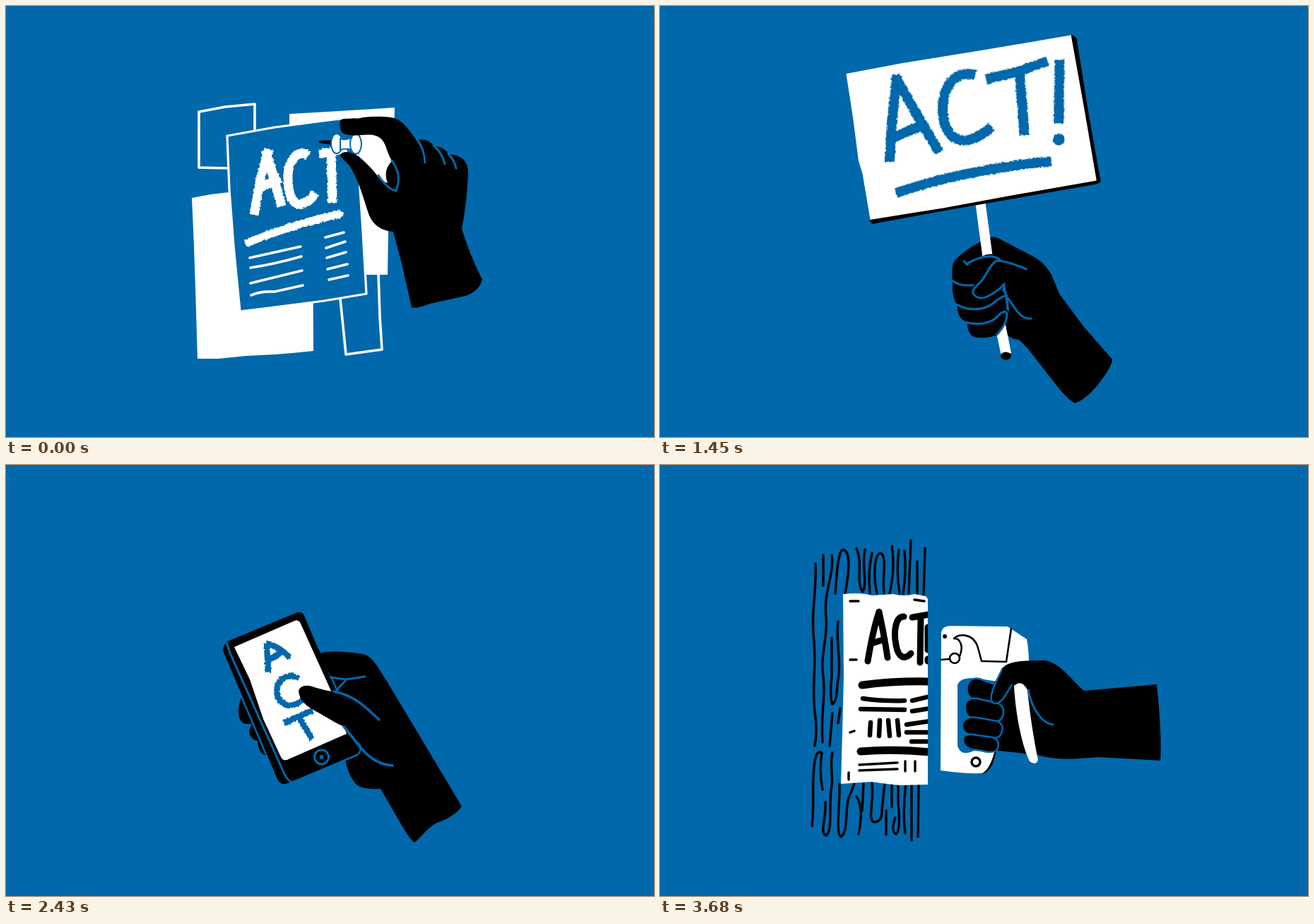
Write an HTML page that moves like this. It is 917 px wide and 611 px high and loops after 4.18 s.

```html
<!DOCTYPE html>
<html lang="en">
<head>
<meta charset="utf-8">
<title>Act</title>
<style>
  html, body { margin: 0; width: 100%; height: 100%; overflow: hidden; background: #0068ab; }
  svg { display: block; width: 100%; height: 100%; }
  path, circle, ellipse { stroke-linecap: round; stroke-linejoin: round; }
  .k { fill: #000; }
  .w { fill: #fff; }
  .b { fill: #0068ab; }
  .ks { fill: none; stroke: #000; stroke-width: 3.4; }
  .ws { fill: none; stroke: #fff; stroke-width: 3.6; }
  .bs { fill: none; stroke: #0068ab; stroke-width: 3; }
  .brush { filter: url(#rough); }
  .brush path { stroke-linecap: butt; }
  #screen.inverted .w { fill: #0068ab; }
  #screen.inverted .bs { stroke: #fff; }
</style>
</head>
<body>
<svg viewBox="0 0 917 611">
  <defs>
    <filter id="rough" x="-10%" y="-10%" width="120%" height="120%" color-interpolation-filters="sRGB">
      <feTurbulence type="fractalNoise" baseFrequency=".3" numOctaves="2" seed="4"/>
      <feDisplacementMap in="SourceGraphic" scale="4" xChannelSelector="R" yChannelSelector="G"/>
    </filter>
    <clipPath id="outsidePaper"><path d="M414 0H917V611H414Z"/></clipPath>
    <clipPath id="notice"><path d="M0 0H379V611H0Z"/></clipPath>
  </defs>

  <!-- Pinning a poster -->
  <g id="pinScene">
    <path class="w" d="M263 272L290 267L316 264H434L435 489L405 492L380 494L340 496L300 500L271 500L268 400L266 340Z"/>
    <path class="ws" d="M352 178V139L310 143L273 150V229L318 230"/>
    <path class="w" d="M401 153L470 149L550 144L548 220L541 320L540 381H500V160L401 175Z"/>
    <path class="ws" d="M473 415L481 494L532 487L529 440L527 380"/>
    <path class="b" stroke="#fff" stroke-width="3.2" d="M313 184L380 172L440 164L496 157L498 215L505 320L510 408L450 418L380 427L331 433L322 340L316 260Z"/>
    <g class="ws brush" style="stroke-width:13">
      <path d="M351 296L360 245L372 203M367 204L378 240L390 284M356 259L388 244"/>
      <path d="M428 212C414 202 400 218 399 240C399 270 406 284 420 280C428 278 433 272 438 265"/>
      <path d="M443 210L482 202M460 206L462 279"/>
      <path style="stroke-width:11;stroke-linecap:round" d="M343 335C380 320 420 306 472 295"/>
    </g>
    <path class="ws" d="M345 357L417 341M346 371Q380 366 418 355M346 393L419 375M347 410Q360 404 380 405L420 396M452 328L478 321M453 343L480 334M454 357L481 349M455 373L483 366M457 388L484 382"/>
    <g clip-path="url(#outsidePaper)">
      <g id="pin">
        <path class="k" d="M442 191L462 190V197L443 194Z"/>
        <g class="w" stroke="#0068ab" stroke-width="2">
          <ellipse cx="468" cy="195" rx="8" ry="14"/>
          <path d="M473 188Q482 191 490 186V204Q482 201 473 204Z"/>
          <ellipse cx="495" cy="195.500" rx="8" ry="14"/>
        </g>
      </g>
    </g>
    <g id="pinHand">
      <path id="pinFingers" class="k"/>
      <path class="bs" d="M527 240Q540 260 552 262Q561 240 546 219M581 188Q592 202 593 222M605 198Q616 206 621 224M626 210Q634 217 637 230"/>
    </g>
  </g>

  <!-- Waving a sign -->
  <g id="signScene">
    <path class="k" d="M500 375L540 363Q553 378 560 395L565 408L600 455L640 501Q640 509 625 530Q604 558 587 563Q576 558 555 530L520 485L508 473Q496 472 490 465L488 430Z"/>
    <path class="w" d="M475 459L489 452L497 492L483 496Z"/>
    <ellipse class="k" cx="489.500" cy="496" rx="7.500" ry="5.500"/>
    <path class="bs" d="M488 405Q493 416 500 425Q512 445 525 443"/>
    <g id="sign">
      <path class="k" d="M416 362C425 352 440 340 455 334C462 328 470 326 478 329L524 353Q545 363 556 385L505 425L488 408L491 440L480 465C470 470 450 473 442 468C434 460 436 452 434 448C424 444 420 436 421 424C415 418 413 405 414 393C413 385 412 370 416 362Z"/>
      <path class="w" d="M445 275L459 273L470 352Q462 351 456 355Z"/>
      <path class="k" d="M575 42L583 41L588 46L605 150L623 249L617 252L400 291L300 310L296 305Z"/>
      <path class="w" d="M262 97L340 82L460 62L580 41L600 150L617 247L500 268L400 287L345 296L297 304L286 240L280 220L272 160Z"/>
      <g class="bs brush" style="stroke-width:14">
        <path d="M324 222L327 165L334 99M331 100L362 154L394 208M330 187L376 167"/>
        <path d="M445 98C413 89 398 120 399 148C400 182 417 194 436 190C450 187 459 179 468 171"/>
        <path d="M460 104L505 93L547 78M507 92L515 183M564 76L563 166"/>
        <path d="M333 266Q430 232 553 220"/>
        <circle class="b" cx="563" cy="189" r="8.500" stroke="none"/>
      </g>
      <path class="bs" d="M430 362L435 367M433 366Q465 348 480 359M518 373C500 365 485 361 476 361C467 366 462 381 455 390C448 397 441 402 443 407C447 416 458 415 463 412C474 407 482 400 487 394Q486 402 490 410M414 390Q424 398 443 396M421 424C435 432 455 432 468 424C476 418 482 412 488 411M434 449C450 453 468 450 477 441C485 432 492 430 491 440Q489 453 477 466"/>
      <path class="b" d="M487 394L484 403L490 411L490 430L494 433L493 416Z"/>
    </g>
  </g>

  <!-- Tapping a phone -->
  <g id="phoneScene">
    <path class="k" d="M333 330C327 345 327 362 338 367H348C341 378 345 389 356 391C356 402 361 411 369 412L390 400L350 320Z"/>
    <path class="k" d="M443 267C460 262 490 266 505 268C520 272 526 287 535 300L580 375L645 484C640 492 625 503 610 507C595 515 588 528 578 535C570 531 556 503 530 459C515 460 500 458 495 452C488 444 483 432 481 422L470 380L440 300Z"/>
    <path class="k" stroke="#0068ab" stroke-width="2.500" d="M317 247L411 208C416 206 421 208 423 213L501 396C503 404 501 408 497 411L400 452C392 455 386 453 383 446L306 264C305 256 309 251 317 247Z"/>
    <path class="k" d="M425 228L445 266L475 290L461 303Z"/>
    <path class="bs" d="M312 252L318 269L394 438Q398 447 405 450"/>
    <circle class="bs" cx="446.500" cy="414" r="10"/>
    <circle class="b" cx="446.500" cy="414" r="3"/>
    <g id="screen">
      <path class="w" d="M323 258L408 221C413 219 416 222 417 225L459 318L482 381L400 417C394 420 391 418 389 414L364 360L345 304Z"/>
      <g class="bs brush" style="stroke-width:8.500">
        <path d="M371 294L369 252M368 253Q383 255 402 273M371 277L389 266"/>
        <path d="M414 303C405 296 391 299 385 311C380 326 388 339 400 341Q413 341 424 329"/>
        <path d="M393 366L434 348M413 355L433 389"/>
      </g>
    </g>
    <path class="bs" d="M459 301L481 304L508 300M482 304L468 319"/>
    <g id="thumb">
      <path class="k" d="M414 320Q417 311 430 313C445 318 460 321 470 323C490 328 507 337 528 361L547 426C532 426 515 413 505 400C494 388 486 375 476 370C463 364 448 354 440 350C425 342 415 334 414 320Z"/>
      <path class="bs" style="stroke-width:3.600" d="M464 321C490 326 506 340 528 361M478 371C490 384 502 405 517 415Q530 425 547 426"/>
    </g>
  </g>

  <!-- Stapling a notice to a post -->
  <g id="stapleScene">
    <g class="ks">
      <path d="M220 140C222 180 213 210 218 250C221 290 215 310 219 350Q223 375 219 398M231 128V171M243 128C247 155 231 180 235 215C238 245 226 270 231 300C235 330 227 350 230 393M248 182C250 160 251 122 259 120C270 122 268 150 262 182M252 222C248 250 258 280 251 310Q250 337 244 339Q240 330 243 300V245M255 345L252 366M244 352L240 398"/>
      <path d="M278 118C288 140 276 165 287 180C294 165 285 145 290 120M300 125Q294 150 297 182M307 182C301 155 304 126 312 125C322 128 314 160 317 182M328 115Q333 145 325 182M338 120Q334 150 339 182M346 122Q349 150 344 182M355 107L352 182M364 137V182M375 118L373 184"/>
      <path d="M215 512C219 480 214 450 219 420Q222 403 229 408Q225 435 230 460M234 478C236 500 225 522 235 525C245 520 238 480 243 455C245 440 240 425 244 408M254 452C255 480 248 522 256 527C268 520 260 480 270 465L275 452M278 470Q289 485 281 523M288 452L286 490M300 452C303 475 294 502 302 506Q315 507 314 488L318 452M320 490V524M328 452V485M333 500Q326 520 334 523Q341 518 337 480V452M348 452Q343 490 347 522M356 452V532M366 452L365 527"/>
    </g>
    <path class="w" d="M259 183Q285 180 300 185L330 183Q345 187 360 183L376 186L379 190V453L340 454Q318 452 300 449L256 452L258 380L260 300Z"/>
    <g class="ks" clip-path="url(#notice)">
      <path style="stroke-width:9" d="M294 278Q301 235 310 208Q317 240 322 273M299 253L318 247M345 215C334 214 330 235 334 255C337 273 346 277 355 267M357 216L380 212M369 216L368 280M379 230V262M379 275V278"/>
      <path style="stroke-width:11" d="M286 312Q330 306 382 307M284 406Q330 402 382 407"/>
      <path style="stroke-width:6.500" d="M287 331Q315 335 346 334M284 346L346 347M357 334L382 328M357 349L382 345M349 368L382 363M349 379H382M356 392H382M298 365L297 383M311 362L310 384M323 362L325 384M336 362L338 383"/>
      <path d="M282 425L336 422M282 433L336 431M347 420V434M361 420V434M269 193H281M269 276H278M269 379L275 377M267 436V446M360 191L374 193"/>
    </g>
    <g id="stapler">
      <path class="k" d="M455 438C468 436 474 420 477 398L470 395Z"/>
      <path class="w" d="M398 237Q399 229 410 228L492 229L519 247Q524 270 521 325L476 395C472 415 466 432 456 437Q430 438 397 433Z"/>
      <path class="b" d="M421 312Q424 301 445 302L485 308V392L446 404Q426 415 421 398Z"/>
      <path class="ks" style="stroke-width:2.600" d="M398 276L410 275M424 271C430 258 425 245 416 246C422 239 442 238 449 256Q452 266 455 278L490 279L497 232"/>
      <circle class="ks" style="stroke-width:2.600" cx="417" cy="274" r="7"/>
      <circle class="ks" cx="447" cy="421" r="6"/>
      <circle class="k" cx="403" cy="243" r="3"/>
      <path class="k" d="M485 288C492 278 515 277 545 277C570 283 580 303 600 320L703 311C707 350 710 390 708 419L620 414C590 417 560 419 535 411L478 405L455 401L450 315L468 318Z"/>
      <g class="k" stroke="#0068ab" stroke-width="2.500">
        <path d="M435 312Q439 300 452 303L477 312Q483 338 470 338L444 333Q432 327 435 312Z"/>
        <path d="M432 340Q434 329 449 331L479 338Q491 345 483 360Q477 366 466 364L442 360Q430 354 432 340Z"/>
        <path d="M428 367Q432 355 448 358L477 363Q490 369 481 384Q475 389 462 386L440 383Q426 379 428 367Z"/>
        <path d="M429 387Q433 379 448 383L471 386Q484 392 476 405Q468 409 455 405L440 403Q428 399 429 387Z"/>
        <path d="M500 310C492 316 487 339 473 338C462 333 474 310 485 288"/>
      </g>
      <path class="k" d="M484 289L510 278V308L499 312Z"/>
      <path class="w" d="M501 313Q512 303 520 319C523 350 529 390 535 418Q532 427 523 420C511 395 503 350 501 313Z"/>
      <path class="bs" d="M521 319C526 345 540 366 556 368"/>
    </g>
  </g>
</svg>
<script>
  const LOOP = 4180, STEP = 70;
  const el = id => document.getElementById(id);
  const scenes = [["pinScene", 0], ["signScene", 1310], ["phoneScene", 2360], ["stapleScene", 2990]];
  const shift = (id, x, y = 0) => el(id).setAttribute("transform", `translate(${x} ${y})`);
  const turn = (id, angle, x, y) => el(id).setAttribute("transform", `rotate(${angle} ${x} ${y})`);
  const ease = u => u * u * (3 - 2 * u);

  // Index finger and thumb part as `open` goes from 0 to 1.
  function pinchPath(open) {
    const finger = (x, y) => `${x + open} ${y - 8 * open}`;
    const thumb = (x, y) => `${x - 5 * open} ${y + 7 * open}`;
    return `M${finger(473, 163)}C${finger(475, 157)} ${finger(490, 162)} ${finger(505, 158)}
      C520 ${156 - 5 * open} 545 ${156 - 2 * open} 552 160C563 164 572 178 581 190
      Q597 187 605 198Q621 200 626 210Q655 212 654 238Q652 280 645 316
      Q655 350 674 388Q669 405 650 411L600 422Q580 430 574 427L560 365L548 320
      Q523 318 514 297C508 280 500 250 490 233
      C${thumb(485, 222)} ${thumb(474, 217)} ${thumb(473, 211)}
      C${thumb(477, 204)} ${thumb(490, 207)} ${thumb(500, 214)}
      Q520 231 530 247L540 251Q533 233 546 220Q540 208 537 198Q532 185 520 183
      C${finger(505, 181)} ${finger(490, 187)} ${finger(476, 180)}
      Q${finger(471, 172)} ${finger(473, 163)}Z`;
  }

  // time, pin push, hand x, hand y, finger opening
  const pinPoses = [
    [0, 0, 0, 0, 0],
    [500, 0.5, -20, -4, 0],
    [570, 1, -40, -8, 0],
    [640, 1, -38, -8, 0.3],
    [740, 1, -29, -7, 0.7],
    [810, 1, -20, -6, 1]
  ];

  function drawPin(t) {
    const [, push, x, y, open] = pinPoses.findLast(pose => pose[0] <= t);
    shift("pin", -40.5 * push, -7.5 * push);
    shift("pinHand", x, y);
    el("pinFingers").setAttribute("d", pinchPath(open));
  }

  function drawSign(t) {
    const step = Math.floor((t - 1310) / STEP);
    turn("sign", -2.25 - 5 * Math.cos(step * Math.PI / 3), 503, 427);
  }

  function drawPhone(t) {
    const step = Math.floor((t - 2360) / STEP);
    const lift = (1 - Math.cos((step - 1) * Math.PI / 3)) / 2;
    turn("thumb", 12 * lift, 535, 390);
    el("screen").classList.toggle("inverted", lift > 0.7);
  }

  function drawStapler(t) {
    const step = Math.min(7, Math.floor((t - 3260) / STEP) + 1);
    shift("stapler", t < 3060 ? -26 : t < 3260 ? -32 : -32 * (1 - ease(step / 7)));
  }

  const draw = [drawPin, drawSign, drawPhone, drawStapler];

  function frame() {
    const t = performance.now() % LOOP;
    const current = scenes.findLastIndex(([, start]) => start <= t);
    scenes.forEach(([id], i) => { el(id).style.display = i === current ? "" : "none"; });
    draw[current](t);
    requestAnimationFrame(frame);
  }
  frame();
</script>
</body>
</html>
```
